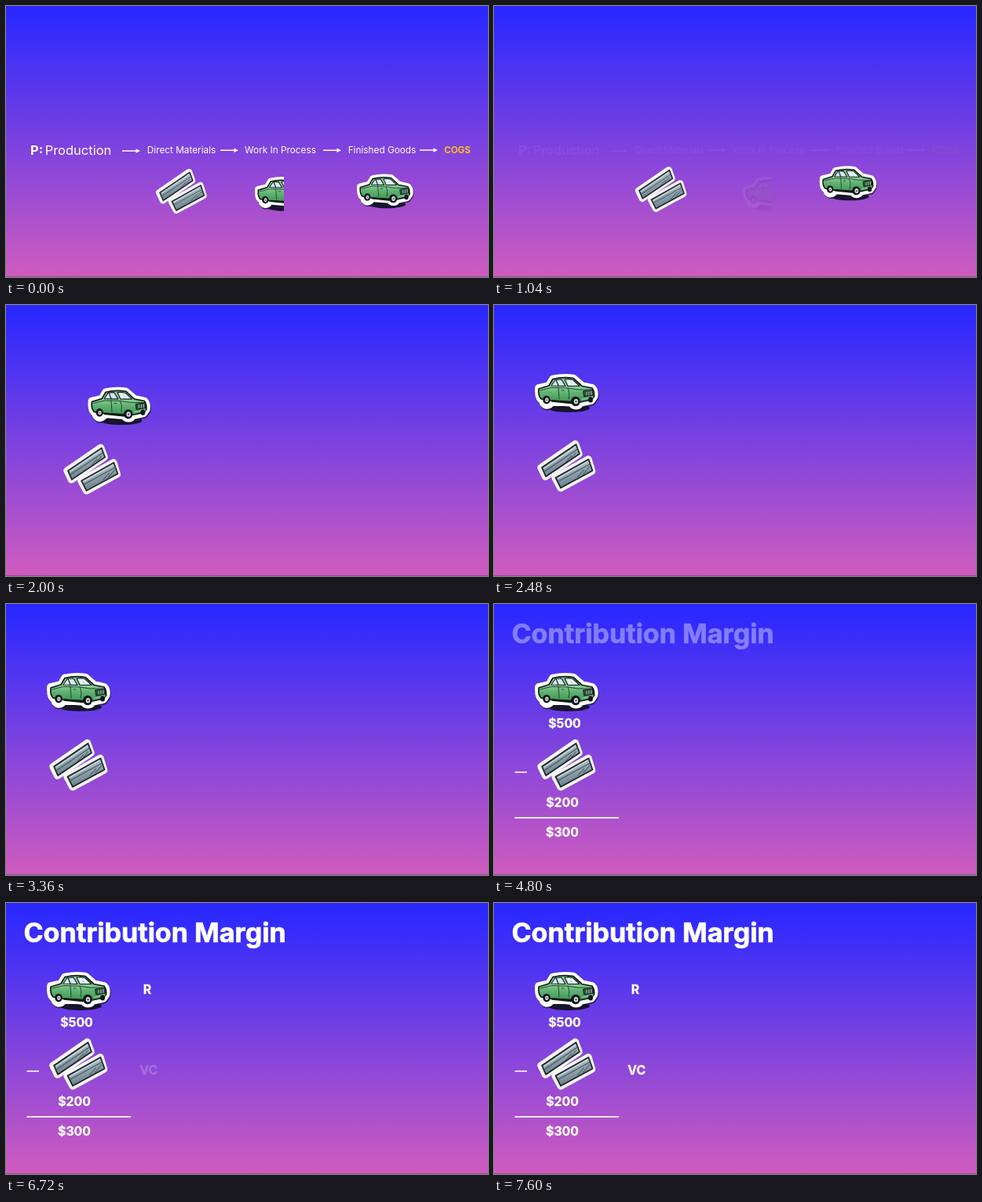
Recreate the animation shown at these times as an HTML page. Size 614x346 px, loop 8 s.

```html
<!DOCTYPE html>
<html lang="en">
<head>
<meta charset="utf-8">
<title>Contribution Margin</title>
<style>
  html, body { margin: 0; width: 100%; height: 100%; overflow: hidden; background: #2a28ff; }
  svg { display: block; width: 100vw; height: 100vh; }
  text { font-family: Inter, "Open Sans", sans-serif; fill: #fff; }
  .mid { text-anchor: middle; }
  .step { font-size: 11.8px; text-anchor: middle; }
  .bold { font-weight: 700; }
  .value { font-size: 15.8px; font-weight: 700; text-anchor: middle; stroke: #fff; stroke-width: .3; }
  #title { font-size: 34.1px; stroke: #fff; stroke-width: .7; }
</style>
</head>
<body>
<svg viewBox="0 0 614 346" xmlns="http://www.w3.org/2000/svg">
  <defs>
    <linearGradient id="sky" x1="0" y1="0" x2="0" y2="1">
      <stop offset="0" stop-color="#2a28ff"/>
      <stop offset=".04" stop-color="#2c29fe"/>
      <stop offset="1" stop-color="#d05cbe"/>
    </linearGradient>
    <linearGradient id="metal" x1=".3" y1=".1" x2=".65" y2=".9">
      <stop offset=".2" stop-color="#aebfc6"/>
      <stop offset=".8" stop-color="#71858f"/>
    </linearGradient>
    <linearGradient id="paint" x1="0" y1="0" x2="0" y2="1">
      <stop offset=".35" stop-color="#8fd09a"/>
      <stop offset=".6" stop-color="#62b474"/>
      <stop offset="1" stop-color="#3f9555"/>
    </linearGradient>
    <clipPath id="half"><rect x="300" y="200" width="54" height="80"/></clipPath>

    <!-- two steel bars, centred on 0,0 -->
    <g id="steel" stroke-linejoin="round" stroke-linecap="round">
      <g fill="#f4f4f2" stroke="#f4f4f2" stroke-width="9.4">
        <path d="M-32.5 2L-27 13.5L15.5-15.5L11-28Z"/>
        <path d="M-14.5 15L-7.5 28L32 6.5L27.5-8.5Z"/>
      </g>
      <g fill="url(#metal)" stroke="#18222a" stroke-width="1.7">
        <path d="M-31.5 2L-26.5 13.5L16.5-15.5L12-27.5Z"/>
        <path d="M-14 15L-7.5 28L33 6L28-8.5Z"/>
      </g>
      <g fill="none" stroke="#d0dbe0" stroke-width="1.3">
        <path d="M-28.5 3L11-24M-11 16L26.5-5.5"/>
      </g>
      <g fill="none" stroke="#46575f" stroke-width="1.1">
        <path d="M-28 7L14-21.5M-11 20L30-2.5"/>
        <path d="M-1-5L6-13M6-10L12-17M14 14L22 5M21 10.500L29 1"/>
      </g>
    </g>

    <!-- green car, centred on 0,0 -->
    <path id="outline" stroke-width="9.6" d="M-35-6L-22-9L-17-17.500Q-4-20.500 9-18.500L20-9L33-6Q37-2 35.500 5L32 10L18 13A6 6 0 0 1 7 13L-19 11A5 5 0 0 1-30 10Q-36 8-35-6Z"/>
    <g id="car" stroke-linejoin="round" stroke-linecap="round">
      <ellipse cx="3" cy="19.500" rx="27" ry="5.500" fill="#17142c"/>
      <use href="#outline" x=".8" y="1.600" fill="#17142c" stroke="#17142c" opacity=".8"/>
      <use href="#outline" fill="#fff" stroke="#fff"/>
      <path d="M-35-5L-22-9L-17-17.500Q-4-20.500 9-18.500L20-8.500L33-6Q36-2 35.500 5L32 9L18 12L-20 10L-32 8Q-36 4-35-5Z"
            fill="url(#paint)" stroke="#0c1912" stroke-width="1.7"/>
      <path d="M-19-9L-14-16.500L-6-17L-1-8.500ZM2-8.500L-2-17Q4-18 8.500-16.500L17-8.500Z" fill="#d3e8ee" stroke="#14231d" stroke-width="1.200"/>
      <path d="M-13-16.500L-10-9" fill="none" stroke="#14231d" stroke-width="1.200"/>
      <path d="M5-10L3-15M11-10L7-15" stroke="#fff" stroke-width="1.300"/>
      <path d="M-33-3L-19-6.500L2-6L15-4L33-4M-10-7L-9 8M2-6Q5 0 3 8M-6-3H-3" fill="none" stroke="#20482d"/>
      <path d="M22-2L34-3.500L34.500 3L23 5Z" fill="#2d4a3a" stroke="#0c1912"/>
      <path d="M26-1V3M29-1.500V3M32-2V2.500M20 8.500L34 6" fill="none" stroke="#b8cdbf"/>
      <path d="M-18 10.500L6 13" stroke="#0c1912" stroke-width="2.600"/>
      <g fill="#11161a">
        <ellipse cx="-25" cy="9" rx="4.800" ry="5.300"/>
        <ellipse cx="12" cy="11" rx="5.800" ry="6.200"/>
        <ellipse cx="31" cy="9" rx="3" ry="3.600"/>
      </g>
      <g fill="#d5dcde">
        <ellipse cx="-24.700" cy="9.300" rx="2.200" ry="2.700"/>
        <ellipse cx="12.500" cy="11.300" rx="2.700" ry="3.300"/>
      </g>
      <g fill="#11161a">
        <circle cx="-24.700" cy="9.300" r=".8"/>
        <circle cx="12.500" cy="11.300" r="1"/>
      </g>
    </g>
    <path id="arrow" d="M0-.75H17.500V-2.800L23 0L17.500 2.800V.75H0Z" fill="#fff"/>
  </defs>

  <rect width="614" height="346" fill="url(#sky)"/>
  <rect y="345" width="614" height="1" fill="#6d4a78" opacity=".6"/>

  <g id="flow">
    <text class="bold" x="31" y="190" font-size="16.5">P:</text>
    <text class="mid" x="92" y="190" font-size="16.5">Production</text>
    <text class="step" x="223.5" y="188">Direct Materials</text>
    <text class="step" x="349.5" y="188">Work In Process</text>
    <text class="step" x="479" y="187.7">Finished Goods</text>
    <text class="mid bold" x="575" y="188" font-size="11.5" style="fill:#fdbf1e">COGS</text>
    <use href="#arrow" x="148" y="185"/>
    <use href="#arrow" x="273" y="184.3"/>
    <use href="#arrow" x="404" y="184.3"/>
    <use href="#arrow" x="527" y="184"/>
    <g clip-path="url(#half)">
      <use href="#car" transform="translate(352.5 239.5) scale(.89)"/>
    </g>
  </g>

  <use id="bars" href="#steel"/>
  <use id="auto" href="#car"/>

  <text id="title" class="bold" x="22.4" y="49.5">Contribution Margin</text>
  <g id="sums">
    <text class="value" x="90" y="158">$500</text>
    <text class="value" x="87" y="259">$200</text>
    <text class="value" x="87" y="296.5">$300</text>
    <path d="M26.5 214.7H42" stroke="#fff" stroke-width="1.6"/>
    <path d="M26.5 272.9H159" stroke="#fff" stroke-width="1.8"/>
  </g>
  <text id="rev" class="value" x="180" y="115.5">R</text>
  <text id="cost" class="value" x="181.7" y="219.3">VC</text>
</svg>
<script>
  const LOOP = 8000;
  const el = id => document.getElementById(id);
  const ramp = (t, from, to) => Math.min(1, Math.max(0, (t - from) / (to - from)));
  const ease = p => (1 - Math.cos(Math.PI * p)) / 2;
  const mix = (a, b, p) => a + (b - a) * p;

  // each pose is [x, y, scale]
  const moves = [
    [el('bars'), [223.5, 236.5, 0.875], [92.5, 205.5, 1]],
    [el('auto'), [482.5, 236, 0.89], [92, 112, 1]]
  ];
  const fades = [
    [el('flow'), 1080, 520],
    [el('sums'), 4120, 4740],
    [el('title'), 4550, 5210],
    [el('rev'), 5640, 6200],
    [el('cost'), 6600, 7160]
  ];

  // a fade whose end lies before its start runs from visible to hidden
  function draw(t) {
    const p = ease(ramp(t, 735, 2395));
    for (const [node, a, b] of moves) {
      const [x, y, s] = a.map((v, i) => mix(v, b[i], p).toFixed(3));
      node.setAttribute('transform', `translate(${x} ${y}) scale(${s})`);
    }
    for (const [node, from, to] of fades) {
      node.setAttribute('opacity', ramp(t, from, to).toFixed(3));
    }
  }

  const start = performance.now();
  function tick() {
    draw((performance.now() - start) % LOOP);
    requestAnimationFrame(tick);
  }
  draw(0);
  requestAnimationFrame(tick);
</script>
</body>
</html>
```
